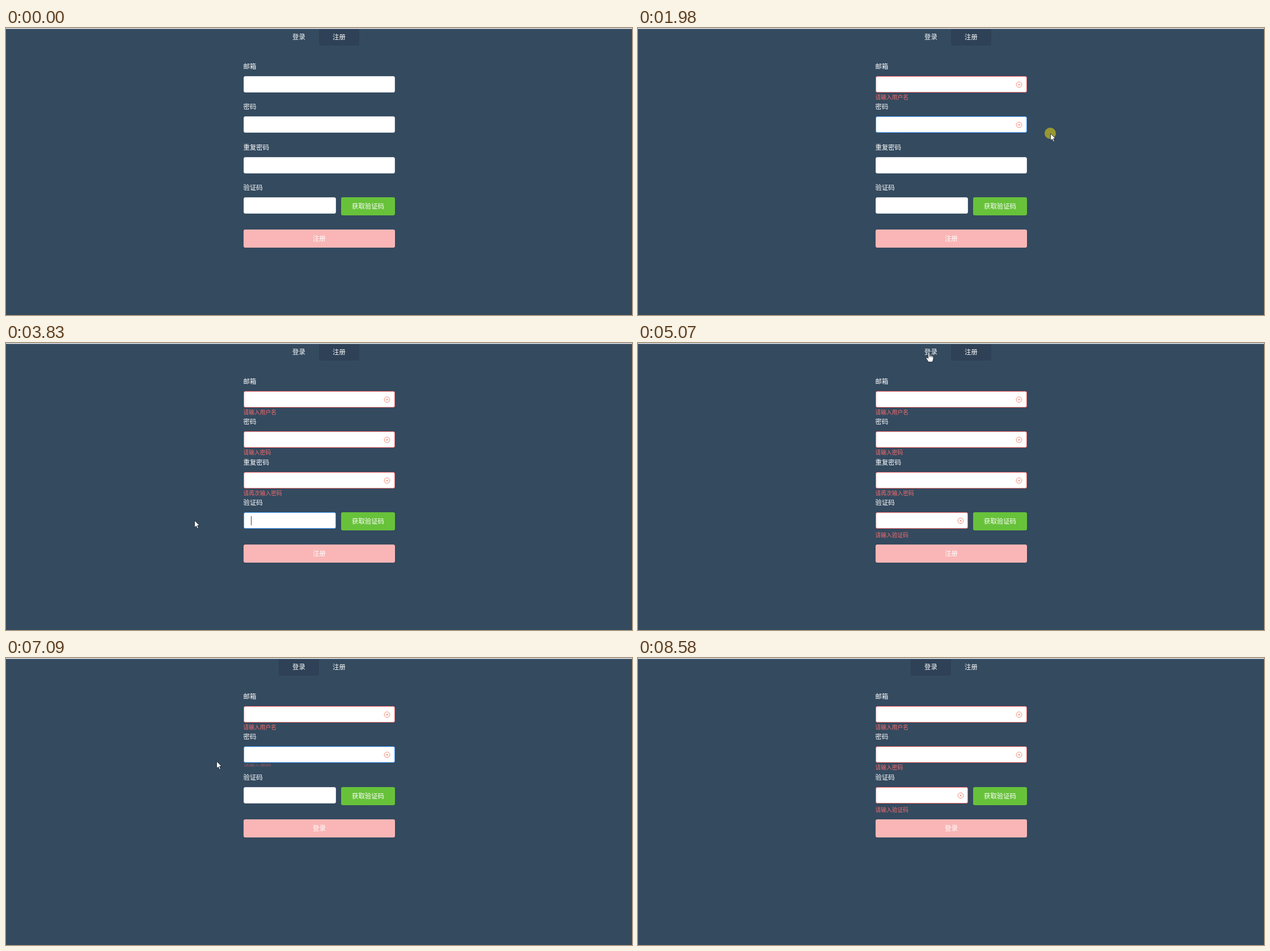
Animation of 1104 by 507 pixels, one loop 9510 ms. Source, as an HTML page:

```html
<!DOCTYPE html>
<html lang="zh-CN">
<head>
<meta charset="utf-8">
<title>登录 / 注册</title>
<style>
html, body { margin: 0; width: 100%; height: 100%; overflow: hidden; background: #344a5f; }
#stage {
  position: relative; width: 1104px; height: 507px; overflow: hidden; background: #344a5f;
  font: 500 11.4px/20px "Noto Sans CJK SC", "Noto Sans CJK", sans-serif; color: #fff;
}
#stage * { position: absolute; box-sizing: border-box; white-space: nowrap; }
.line { left: 0; top: 0; width: 1104px; height: 1px; background: #f4f5f6; }
.line.soft { top: 1px; background: #8b98a5; }
.view { inset: 0; }
.tab { top: 2px; width: 71px; height: 29px; border-radius: 0 0 3px 3px; background: #2e4156; }
.name { top: 5px; width: 71px; text-align: center; }
.label { left: 418.5px; }
.input { left: 419px; width: 267px; height: 29px; border: 1px solid; border-radius: 3px; background: #fff; }
.input.short { width: 163px; }
.caret { left: 12px; top: 6px; width: 1px; height: 16px; background: #444; }
.icon { right: 7.5px; top: 7.5px; width: 12px; height: 12px; fill: none; stroke: #f28b78; }
.short .icon { right: 6.5px; }
.error {
  left: 418.5px; padding-top: 3px; font-size: 9.77px; line-height: 10px;
  color: #f56c6c; transform-origin: top;
}
.button { height: 32px; border-radius: 3px; line-height: 31px; text-align: center; }
.code { left: 591px; width: 95px; background: #67c23a; }
.submit { left: 419px; width: 267px; background: #fab6b6; }
#pointer { left: 0; top: 0; width: 0; height: 0; }
#pointer svg { left: 0; top: 0; width: 1px; height: 1px; overflow: visible; stroke: #1d2630; stroke-width: .9; }
#press { left: -10px; top: -10px; width: 20px; height: 20px; border-radius: 50%; background: rgba(220, 205, 20, .6); }
</style>
</head>
<body>
<div id="stage">
  <div class="view" id="register"><div class="tab" style="left:552px"></div></div>
  <div class="view" id="login"><div class="tab" style="left:481px"></div></div>
  <div class="name" style="left:481px">登录</div>
  <div class="name" style="left:552px">注册</div>
  <div class="line"></div>
  <div class="line soft"></div>
  <div id="pointer">
    <div id="press"></div>
    <svg id="arrow"><path d="M.5 .5V13L3.4 10.3L5.4 14.8L7.5 13.9L5.5 9.5H9.5Z" fill="#fff"/></svg>
    <svg id="beam"><path d="M-3 -7.5H-1L0 -6.5L1 -7.5H3M0 -6.5V6.5M-3 7.5H-1L0 6.5L1 7.5H3" fill="none"/></svg>
    <svg id="hand">
      <path d="M-1.3 1.2Q0 -.3 1.3 1.2V6Q2.6 4.9 3.7 6.2Q5 5.3 6 6.8Q7.8 6.3 8 8.2V12.2L6.4 17.5H-.8L-4.6 11.6Q-5.2 9.3 -3.2 9.5L-1.3 11.2Z" fill="#fff"/>
      <path d="M1.3 6V9M3.7 6.3V9M6 7V9.5" fill="none"/>
    </svg>
  </div>
</div>
<script>
const LOOP = 9510, ENTER = 200, SWITCH = 5150, EXIT = 8560;
const PLAIN = [220, 223, 230], BLUE = [64, 158, 255], RED = [245, 108, 108];

const $ = id => document.getElementById(id);
const toggle = (el, on) => { el.style.visibility = on ? 'inherit' : 'hidden'; };
const ramp = (t, from, to) => Math.min(1, Math.max(0, (t - from) / (to - from)));
const lerp = (a, b, p) => a + (b - a) * p;
const mix = (a, b, p) => a.map((v, i) => lerp(v, b[i], p));
const inOut = p => p < .5 ? 4 * p ** 3 : 1 - 4 * (1 - p) ** 3;
const smooth = p => p * p * (3 - 2 * p);
const out = p => 1 - (1 - p) ** 5;

const fields = [], stops = [], clicks = [];

// The pointer rests at each stop from lead ms before to tail ms after its time
function stop(time, x, y, lead = 100, tail = 90) {
  stops.push({ x, y, from: time - lead, to: time + tail });
}

function click(time, x, y) {
  stop(time, x, y);
  clicks.push(time);
}

function add(parent, cls, top, text = '') {
  const el = document.createElement('div');
  el.className = cls;
  el.style.top = top + 'px';
  el.textContent = text;
  return parent.appendChild(el);
}

function form(view, title, labels, errors) {
  const last = labels.length - 1;
  labels.forEach((label, row) => {
    const y = Math.round(85 + 71.3 * row), short = row === last;
    add(view, 'label', y - 28, label);
    const input = add(view, short ? 'input short' : 'input', y);
    const caret = add(input, 'caret', 6);
    input.insertAdjacentHTML('beforeend',
      '<svg class="icon" viewBox="-6 -6 12 12"><circle r="4.9"/><path d="M-1.7 -1.7L1.7 1.7M1.7 -1.7L-1.7 1.7"/></svg>');
    const error = add(view, 'error', y + (short ? 31.5 : 29), errors[row]);
    fields.push({ view, y, input, caret, icon: input.lastChild, error });
  });
  const y = fields.at(-1).y;
  add(view, 'button code', y, '获取验证码');
  add(view, 'button submit', y + 57, title);
}

// Click into a field, then onto the empty page beside it
function visit(index, focus, blur, x, y) {
  const field = fields[index];
  Object.assign(field, { focus, blur });
  click(focus, field.view === $('login') ? 490 : 560, field.y + 15);
  click(blur, x, y);
}

form($('register'), '注册', ['邮箱', '密码', '重复密码', '验证码'],
  ['请输入用户名', '请输入密码', '请再次输入密码', '请输入验证码']);
form($('login'), '登录', ['邮箱', '密码', '验证码'],
  ['请输入用户名', '请输入密码', '请输入验证码']);

stop(ENTER, 600, 27);
visit(0, 630, 1200, 727, 100);
visit(1, 1640, 1975, 727, 186);
visit(2, 2700, 3150, 719, 247);
visit(3, 3590, 3925, 332, 313);
stop(4670, 502, 25);
click(SWITCH, 513, 16);
visit(4, 5600, 6040, 352, 135);
stops.splice(-1, 0, { x: 342, y: 133, from: 5830, to: 5900 });
visit(5, 6650, 7052, 371, 182);
visit(6, 7800, 8180, 319, 240);
stop(EXIT, 400, -20, 0);

function pointerAt(t) {
  const next = stops.findIndex(s => s.from > t);
  if (next < 0) return stops.at(-1);
  const a = stops[Math.max(0, next - 1)], b = stops[next];
  const p = smooth(ramp(t, a.to, b.from));
  return { x: lerp(a.x, b.x, p), y: lerp(a.y, b.y, p) };
}

function drawField({ input, caret, icon, error, focus, blur }, t) {
  const focused = mix(PLAIN, BLUE, inOut(ramp(t, focus, focus + 200)));
  const border = mix(focused, RED, inOut(ramp(t, blur, blur + 200)));
  const grow = out(ramp(t, blur, blur + 300));
  input.style.borderColor = `rgb(${border.map(Math.round)})`;
  toggle(caret, t >= focus && t < blur);
  toggle(icon, t >= blur);
  error.style.opacity = grow;
  error.style.transform = grow < 1 ? `scaleY(${grow})` : 'none';
}

function drawPointer(t, view) {
  const { x, y } = pointerAt(t);
  const inField = fields.some(f => f.view === view && y > f.y && y < f.y + 29
    && x > 419 && x < 419 + f.input.offsetWidth);
  const onTab = y < 31 && x > 481 && x < 552;
  const kind = inField ? 'beam' : onTab ? 'hand' : 'arrow';
  $('pointer').style.transform = `translate(${Math.round(x)}px, ${Math.round(y)}px)`;
  toggle($('pointer'), t >= ENTER && t < EXIT);
  for (const id of ['arrow', 'beam', 'hand']) toggle($(id), id === kind);
  toggle($('press'), clicks.some(c => t > c - 70 && t < c + 30));
}

function draw() {
  const t = performance.now() % LOOP;
  const view = t < SWITCH ? $('register') : $('login');
  $('register').style.display = t < SWITCH ? 'block' : 'none';
  $('login').style.display = t < SWITCH ? 'none' : 'block';
  fields.forEach(f => drawField(f, t));
  drawPointer(t, view);
  requestAnimationFrame(draw);
}
draw();
</script>
</body>
</html>
```
